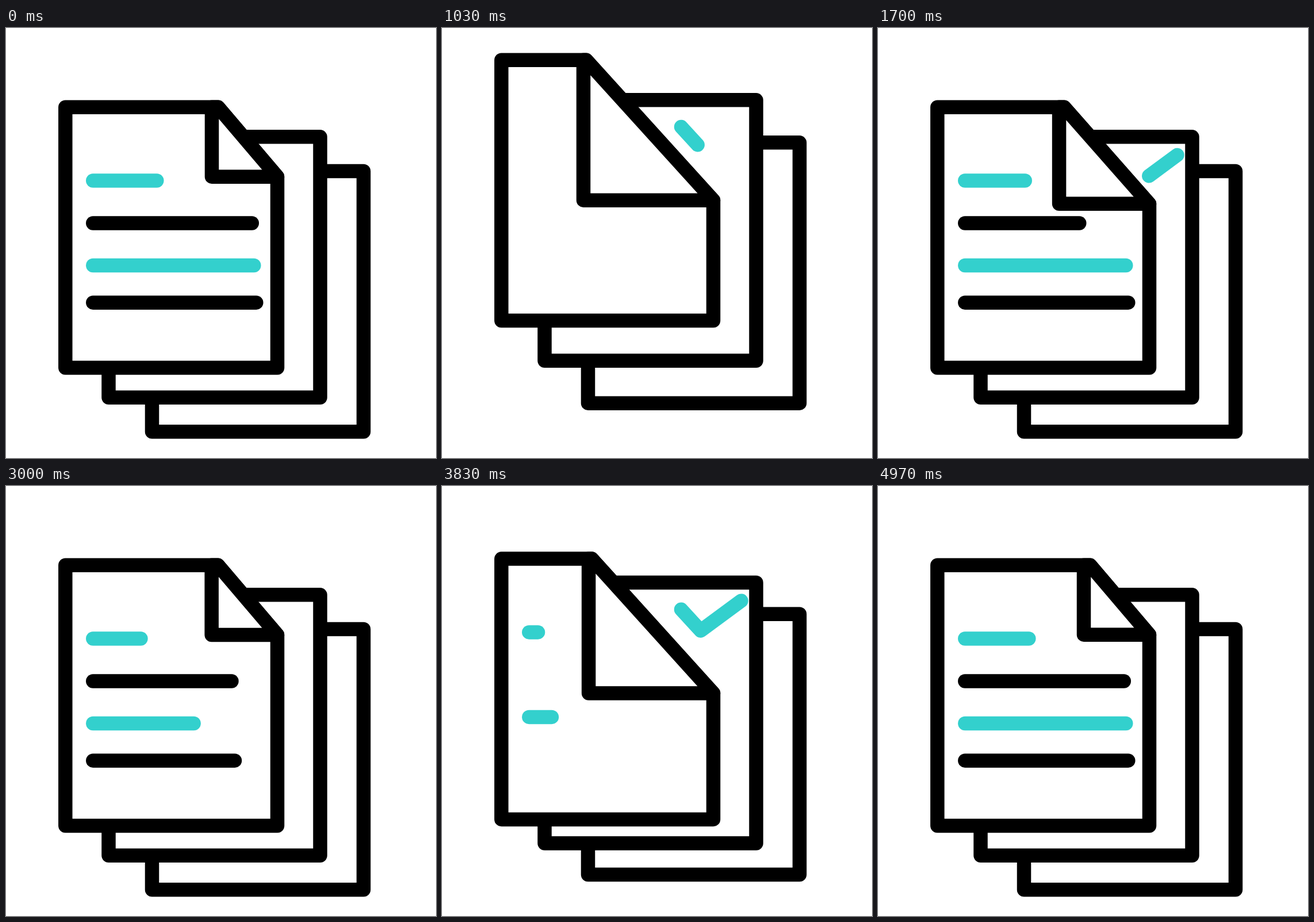
An HTML page with a canvas for the animation above (5010 ms loop, 748 by 748 pixels).

```html
<!DOCTYPE html>
<html lang="en">
<head>
<meta charset="utf-8">
<title>Document pages</title>
<style>
  html, body { margin: 0; width: 100%; height: 100%; overflow: hidden; background: #fff; }
  canvas { display: block; width: 100vmin; height: 100vmin; }
</style>
</head>
<body>
<canvas id="stage" width="748" height="748"></canvas>
<script>
const ctx = document.getElementById('stage').getContext('2d');
const LOOP = 5010, CYCLE = 2500;
const BLACK = '#000', TEAL = '#33d0cd';

// Eased progress from 0 to 1 between two times
function ease(t, start, end) {
  const u = Math.min(1, Math.max(0, (t - start) / (end - start)));
  return (1 - Math.cos(Math.PI * u)) / 2;
}

const lift = t => ease(t, 514, 914) - ease(t, 955, 1445);
const foldAmount = t => 112 * (ease(t, 488, 873) - ease(t, 1157, 2103));

// y, full length, colour, then shrink and regrow times
const lines = [
  { y: 265.5, len: 111, color: TEAL, out: [243, 1015], back: [1179, 1798] },
  { y: 339.5, len: 276.5, color: BLACK, out: [349, 1002], back: [1340, 1900] },
  { y: 413, len: 280, color: TEAL, out: [184, 941], back: [1218, 1678] },
  { y: 477.7, len: 284, color: BLACK, out: [339, 1025], back: [1335, 1690] }
];

const check = [[416, 236], [450, 273], [520.5, 221]];

function trace(points, closed) {
  ctx.beginPath();
  points.forEach(([x, y]) => ctx.lineTo(x, y));
  if (closed) ctx.closePath();
}

function stroke(color) {
  ctx.strokeStyle = color;
  ctx.stroke();
}

function sheet(points) {
  trace(points, true);
  ctx.fillStyle = '#fff';
  ctx.fill();
  stroke(BLACK);
}

function box(x, y, w, h) {
  sheet([[x, y], [x + w, y], [x + w, y + h], [x, y + h]]);
}

// Part of a polyline between two fractions of its length
function trim(points, from, to) {
  const sizes = points.slice(1).map((p, i) => Math.hypot(p[0] - points[i][0], p[1] - points[i][1]));
  const total = sizes.reduce((a, b) => a + b);
  const result = [];
  let pos = 0;
  sizes.forEach((size, i) => {
    const a = Math.max(0, (from * total - pos) / size);
    const b = Math.min(1, (to * total - pos) / size);
    if (a < b) {
      for (const k of [a, b]) {
        result.push(points[i].map((v, n) => v + (points[i + 1][n] - v) * k));
      }
    }
    pos += size;
  });
  return result;
}

function shifted(dy, paint) {
  ctx.save();
  ctx.translate(0, -dy);
  paint();
  ctx.restore();
}

function drawMiddle(t) {
  box(178.5, 189.3, 368, 453.5);
  const part = trim(check, ease(t, 1500, 1875), ease(t, 900, 1250));
  if (part.length) {
    trace(part);
    stroke(TEAL);
  }
}

function drawFront(t) {
  const d = foldAmount(t);
  const x = 358 - d, y = 258.7 + d * 1.097;
  const top = 137.7, tip = x + 11 - d * 0.055;

  sheet([[103.3, top], [tip, top], [472, y], [472, 591], [103.3, 591]]);
  for (const line of lines) {
    const len = line.len * (1 - ease(t, ...line.out) + ease(t, ...line.back));
    if (len < 0.5) continue;
    trace([[151.3, line.y], [151.3 + len, line.y]]);
    stroke(line.color);
  }
  sheet([[x, top], [tip, top], [472, y], [x, y]]);
}

function draw(t) {
  ctx.fillStyle = '#fff';
  ctx.fillRect(0, 0, 748, 748);
  ctx.lineWidth = 24.5;
  ctx.lineCap = ctx.lineJoin = 'round';
  shifted(50 * lift(t - 139), () => box(254, 249, 368, 453.3));
  shifted(64 * lift(t - 78), () => drawMiddle(t));
  shifted(87 * lift(t), () => drawFront(t));
}

const begin = performance.now();
function tick() {
  const t = (performance.now() - begin) % LOOP;
  draw(t < CYCLE ? t : t - CYCLE);
  requestAnimationFrame(tick);
}
tick();
</script>
</body>
</html>
```
